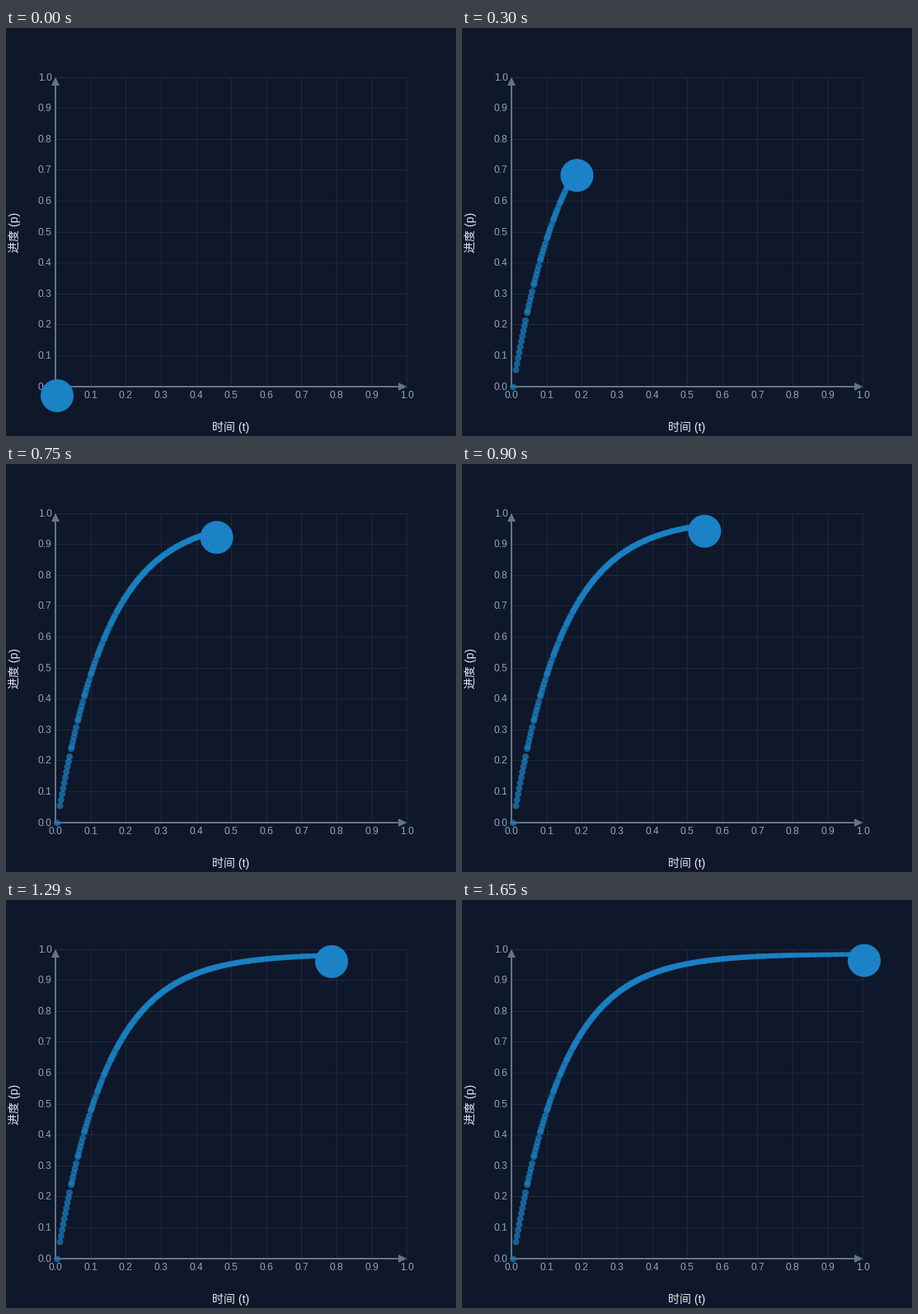
These frames come from a looping animation (546 by 496 pixels, 1.68 s). A matplotlib script:

```python
import numpy as np
import matplotlib.pyplot as plt
from matplotlib.animation import FuncAnimation
from matplotlib.patches import Circle, Polygon

W, H, DPI = 546, 496, 64
FRAMES, STEP = 56, 30
LEFT, TOP, WIDTH, HEIGHT = 60, 59.5, 426, 376
BG, GRID, AXIS = "#0f172a", "#1e293b", "#64748b"
TICK, TITLE, BLUE = "#94a3b8", "#e2e8f0", "#1a82c5"
FONTS = ["Liberation Sans", "Noto Sans CJK JP"]


def pt(px):
    return px * 72 / DPI


def ease_out_expo(t):
    return 1 - 2.0 ** (-10 * t)


fig = plt.figure(figsize=(W / DPI, H / DPI), dpi=DPI, facecolor=BG)
ax = fig.add_axes([0, 0, 1, 1])
ax.set_xlim(0, W)
ax.set_ylim(H, 0)
ax.axis("off")


def line(xs, ys, color, width, z):
    ax.plot(xs, ys, color=color, lw=pt(width), zorder=z, solid_capstyle="butt")


def label(x, y, text, size, color, **kw):
    ax.text(x, y, text, fontsize=pt(size), color=color, family=FONTS,
            va="baseline", zorder=3, **kw)


def draw_chart():
    right = LEFT + WIDTH
    for i in range(11):
        x = LEFT + 0.2 + WIDTH * i / 10
        y = TOP + HEIGHT * (1 - i / 10)
        line([x, x], [TOP, TOP + HEIGHT], GRID, 1, 1)
        line([LEFT, right], [y, y], GRID, 1, 1)
        label(x, 450.5, f"{i / 10:.1f}", 12, TICK, ha="center")
        label(55.5, y + 4, f"{i / 10:.1f}", 12, TICK, ha="right")
    line([LEFT, LEFT], [62, 437], AXIS, 2, 2)
    line([LEFT - 1, 484], [436, 436], AXIS, 2, 2)
    for tri in ([(60, 59.5), (55, 70), (65, 70)],
                [(486.5, 436), (476, 431), (476, 441)]):
        ax.add_patch(Polygon(tri, fc=AXIS, ec="none", zorder=2))
    label(273, 490, "时间 (t)", 14, TITLE, ha="center")
    label(15, 248, "进度 (p)", 14, TITLE, ha="center",
          rotation=90, rotation_mode="anchor")


def trail_times():
    # evenly spaced start, then a repeating uneven rhythm
    start = 0.0084 + 0.003 * np.arange(10)
    beat = np.array([0, 0.0015, 0.0045, 0.0075, 0.0105, 0.014])
    rest = 0.0403 + 0.0186 * np.arange(54)[:, None] + beat
    t = np.concatenate([[0], start, rest.ravel()])
    return t[t <= 1]


draw_chart()
times = trail_times()
dots = np.column_stack([62 + WIDTH * times, 436.5 - 370.8 * ease_out_expo(times)])
sizes = pt(8 - 2.6 * times ** 1.5) ** 2
trail = ax.scatter([], [], color=BLUE, alpha=0.7, linewidths=0, zorder=4)
ball = ax.add_patch(Circle((62, 447), 20, fc=BLUE, ec="none", zorder=5))


def update(k):
    t = k / (FRAMES - 1)
    n = np.searchsorted(times, t, side="right")
    trail.set_offsets(dots[:n])
    trail.set_sizes(sizes[:n], DPI)
    ball.center = (62 + WIDTH * t, 447 - 373.8 * ease_out_expo(t))
    return trail, ball


anim = FuncAnimation(fig, update, frames=FRAMES, interval=STEP,
                     init_func=lambda: update(0), repeat=True, repeat_delay=0)
plt.show()
```
